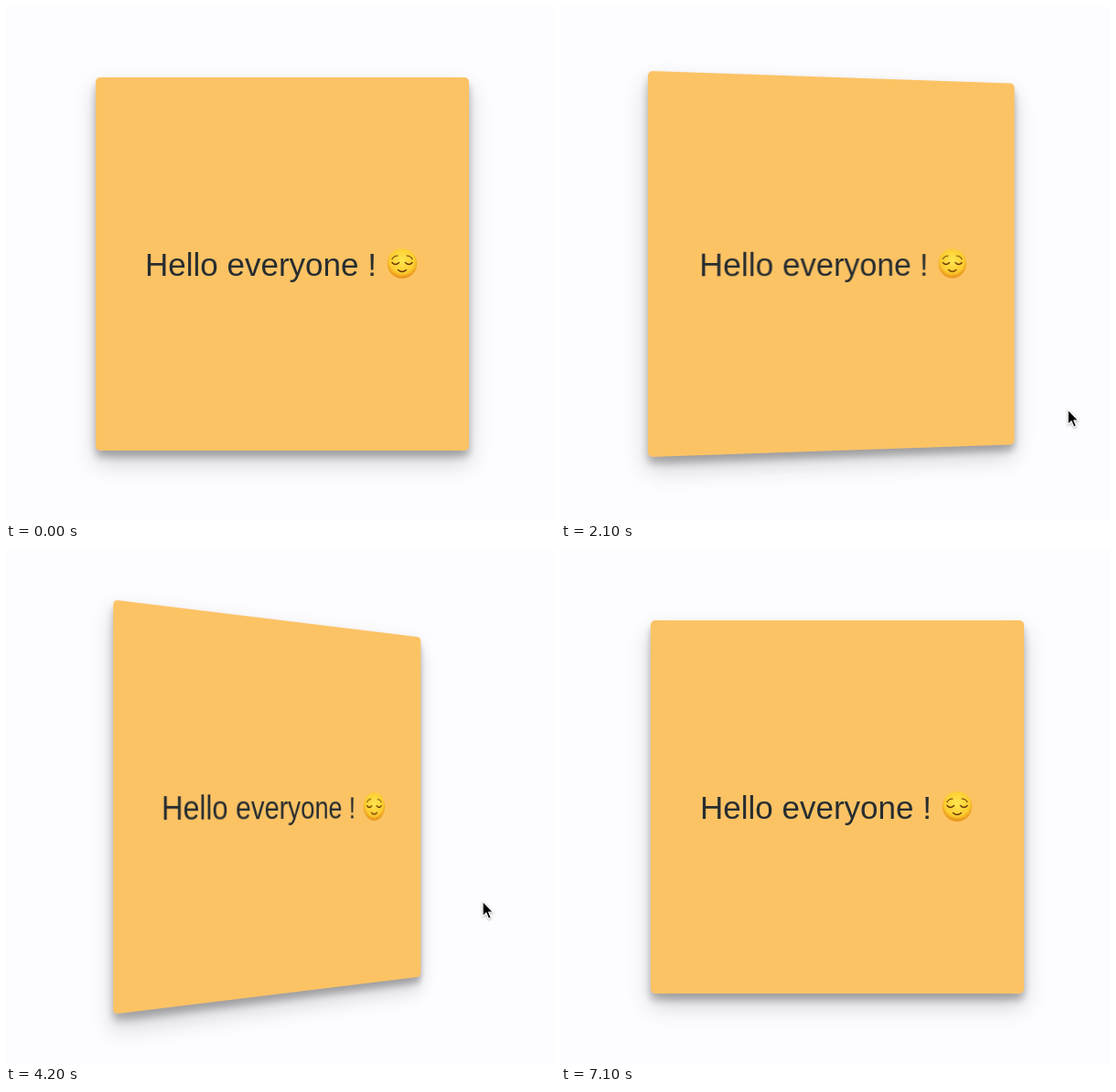
Recreate the animation shown at these times as an HTML page. Size 600x563 px, loop 7.7 s.

```html
<!DOCTYPE html>
<html lang="en">
<head>
<meta charset="utf-8">
<title>Flip card</title>
<style>
  :root { --sun: #fcc365; --ink: #272d2f; }
  html, body { margin: 0; width: 100%; height: 100%; overflow: hidden; background: #fdfcff; }
  .stage { position: relative; width: 600px; height: 563px; overflow: hidden; }
  .scene { position: absolute; left: 98px; top: 78px; width: 407.5px; height: 408px; perspective: 1184px; }
  .card { width: 100%; height: 100%; transform-style: preserve-3d; }
  .face {
    position: absolute; inset: 0; border-radius: 5px; backface-visibility: hidden;
    box-shadow: 0 13px 26px rgba(0, 0, 0, .19), 0 7px 8px rgba(0, 0, 0, .26);
  }
  .front { background: var(--sun); fill: var(--ink); }
  .back { background: var(--ink); fill: var(--sun); transform: rotateY(180deg); }
  .face svg { display: block; width: 408px; height: 408px; }
  text { font: 35px "Liberation Sans", Arial, Helvetica, sans-serif; }
  .cursor { position: absolute; left: 0; top: 0; width: 18px; height: 26px; overflow: visible; }
</style>
</head>
<body>
<div class="stage">
  <div class="scene">
    <div class="card" id="card">
      <div class="face front">
        <svg viewBox="0 0 408 408">
          <defs>
            <radialGradient id="skin" cx=".5" cy=".4" r=".6">
              <stop offset="0" stop-color="#ffe650"/>
              <stop offset=".7" stop-color="#fdcd30"/>
              <stop offset="1" stop-color="#e58a14"/>
            </radialGradient>
          </defs>
          <text x="54" y="217">Hello everyone !</text>
          <g transform="translate(335 203.5)" fill="none" stroke="#6a3c08" stroke-width="1.5" stroke-linecap="round">
            <circle r="16.2" fill="url(#skin)" stroke="none"/>
            <path d="M-11-5q2-3.500 6-3.500M11-5q-2-3.500-6-3.500" stroke-width="1.200"/>
            <path d="M-11-1q3.500 4 7.500 0M11-1q-3.500 4-7.500 0"/>
            <path d="M-4.500 7q4.500 4 9 0"/>
          </g>
        </svg>
      </div>
      <div class="face back">
        <svg viewBox="0 0 408 408">
          <defs>
            <linearGradient id="gold" x1="0" y1="0" x2="1" y2="1">
              <stop offset=".2" stop-color="#f0a01c"/>
              <stop offset=".5" stop-color="#ffe04a"/>
              <stop offset=".8" stop-color="#f5b024"/>
            </linearGradient>
            <clipPath id="cone"><path d="M1 35L7 9Q20 11 29 27Z"/></clipPath>
            <g id="popper" fill="none" stroke-linecap="round">
              <g clip-path="url(#cone)">
                <path d="M0 0h36v36H0z" fill="url(#gold)"/>
                <path d="M0 26l12 12M2 18l18 18M4 10l24 24" stroke="#8039b8" stroke-width="1.800"/>
              </g>
              <ellipse cx="18" cy="18" rx="13" ry="3.500" transform="rotate(40 18 18)" fill="#f3ae22"/>
              <path d="M20 18q7-4 14-3" stroke="#2f7be0" stroke-width="3"/>
              <path d="M8 10Q8 5 3 4" stroke="#3157d5" stroke-width="2"/>
              <path d="M17 12q-4-4 0-9M25 11q0-4 4-4t4-5" stroke="#c92c58" stroke-width="1.800"/>
              <path d="M12 4h0M33 22h0" stroke="#3c6df0" stroke-width="2"/>
              <path d="M22 7h0M31 27h0" stroke="#f2b929" stroke-width="2"/>
              <path d="M32 33h0M34 10h0" stroke="#c552c4" stroke-width="2"/>
            </g>
          </defs>
          <text x="204" y="194" text-anchor="middle">I'm happy to see you</text>
          <use href="#popper" x="150.500" y="206"/>
          <use href="#popper" x="186" y="206"/>
          <use href="#popper" x="221.500" y="206"/>
        </svg>
      </div>
    </div>
  </div>
  <svg class="cursor" id="cursor" viewBox="0 0 18 26">
    <path d="M0 0V16.500l3.800-3.500 2.600 6.200 2.800-1.200-2.500-6h4.800z" fill="#000" stroke="#fff" stroke-width="1.200"
      style="filter: drop-shadow(0 1px 1px rgba(0, 0, 0, .3))"/>
  </svg>
</div>
<script>
  const LOOP = 7700, STEP = 100, LAST = 7100, FLIP = 700;

  // Moments when the pointer enters or leaves the card
  const flips = [336, 1615, 2515, 3849, 4632, 5695];

  // Pointer stops: time, x, y
  const stops = [
    [0, 620, 660], [700, 380, 330], [1300, 400, 400], [1600, 526, 441],
    [2100, 554, 441], [2400, 550, 440], [3000, 308, 323], [3300, 310, 325],
    [4200, 521, 385], [5100, 437, 401], [5600, 437, 405], [5900, 420, 620]
  ];

  const key = (time, transform, easing) => ({ offset: time / LOOP, transform, easing });
  const turn = deg => `rotateY(${deg}deg)`;

  function timeline(id, keys) {
    const last = { ...keys.at(-1), offset: 1 };
    const anim = document.getElementById(id).animate([...keys, last], { duration: LOOP, fill: 'both' });
    anim.pause();
    return anim;
  }

  const turns = flips.flatMap((start, i) => {
    const from = i % 2 * 180;
    return [key(start, turn(from), 'ease'), key(start + FLIP, turn(180 - from), 'linear')];
  });

  const anims = [
    timeline('card', [key(0, turn(0), 'linear'), ...turns]),
    timeline('cursor', stops.map(([t, x, y]) => key(t, `translate(${x}px, ${y}px)`, 'ease-out')))
  ];

  const begin = performance.now();
  function draw() {
    const time = (performance.now() - begin) % LOOP;
    const held = Math.min(Math.floor(time / STEP) * STEP, LAST);
    for (const anim of anims) anim.currentTime = held;
    requestAnimationFrame(draw);
  }
  draw();
</script>
</body>
</html>
```
